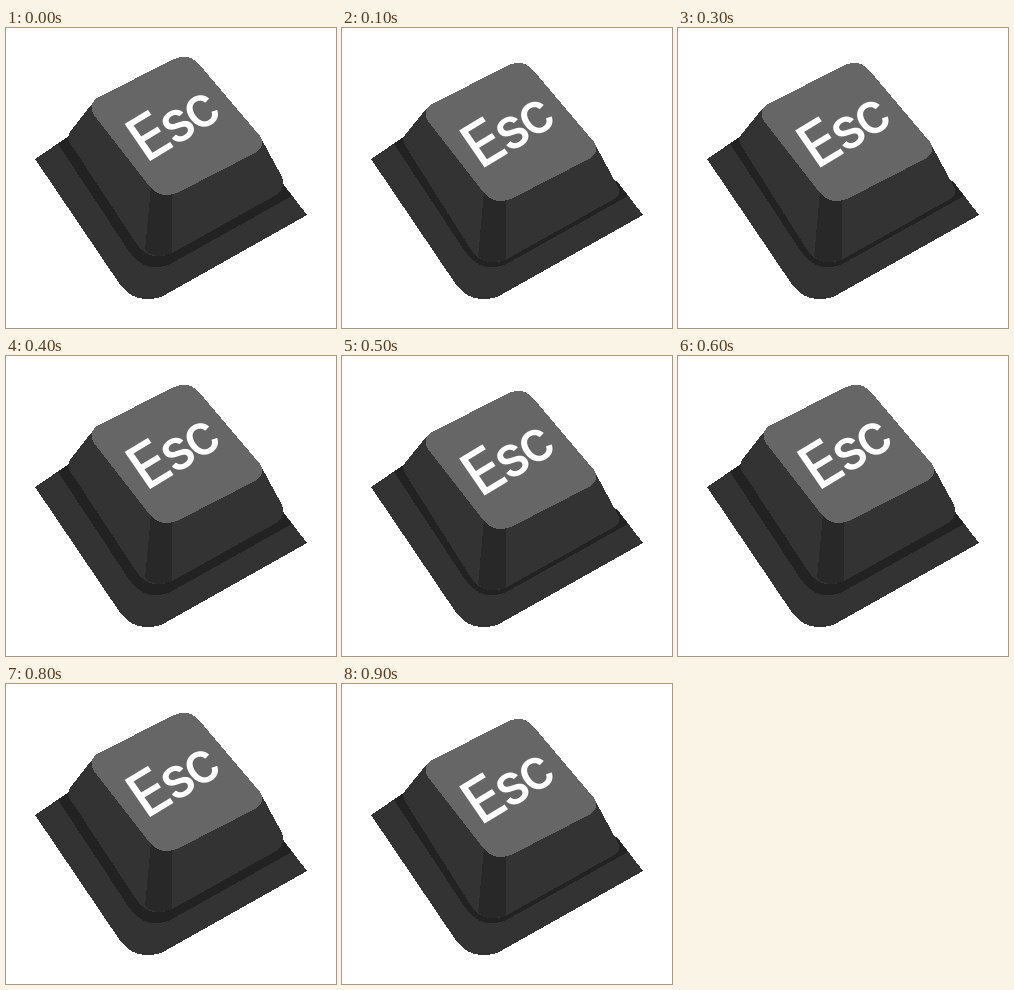
Recreate the animation shown at these times as an HTML page. Size 330 by 300 pixels, loop 1000 ms.

```html
<!DOCTYPE html>
<html lang="en">
<head>
<meta charset="utf-8">
<title>Esc key</title>
<style>
html, body { margin: 0; width: 100%; height: 100%; overflow: hidden; background: #fff; }
svg { display: block; width: 100vw; height: 100vh; shape-rendering: crispEdges; }
text { font: 500 100px Inter, Arial, sans-serif; letter-spacing: -6px; fill: #fff; }
.cap { font-size: 106px; }
.plate, .body { fill: #333; }
.slot { fill: #222; }
.edge { fill: #282828; }
.face { fill: #666; }
#up { animation: up 200ms step-end infinite; }
#down { animation: down 200ms step-end infinite; }
@keyframes up { 0% { opacity: 1 } 50%, 100% { opacity: 0 } }
@keyframes down { 0% { opacity: 0 } 50%, 100% { opacity: 1 } }
</style>
</head>
<body>
<svg viewBox="0 0 330 300">
  <path class="plate" d="M29 131L63 108L275 153L301 187L157 268Q151 271 140 271Q126 271 115 258Z"/>
  <path class="slot" d="M52 116L64 107L275 154L286 168L168 234Q140 249 122 222Z"/>
  <g id="up">
    <path class="body" d="M85 77L64 104Q61 109 64 115L128 212Q139 231 157 228Q162 227 168 224L270 167Q277 163 277 156Q277 151 275 147L256 112Z"/>
    <path class="edge" d="M145 158L139 222Q151 232 166 225L166 165Z"/>
    <path class="face" d="M91 70L168 31Q182 25 192 35L254 108Q260 118 249 125L173 164Q155 172 144 159L88 87Q82 77 91 70Z"/>
    <text transform="matrix(.48 -.29 .33 .481 140.1 135.4)"><tspan class="cap">E</tspan>sc</text>
  </g>
  <g id="down">
    <path class="body" d="M84 81L63 107Q59 112 64 119L126 217Q137 237 156 234Q161 233 167 230L274 170Q280 165 275 157L254 118Z"/>
    <path class="edge" d="M142 164L136 229Q149 238 164 231L164 171Z"/>
    <path class="face" d="M90 76L167 37Q181 31 191 42L252 114Q258 124 247 131L171 170Q153 178 142 165L86 93Q80 83 90 76Z"/>
    <text transform="matrix(.48 -.29 .33 .481 138.6 142)"><tspan class="cap">E</tspan>sc</text>
  </g>
</svg>
</body>
</html>
```
